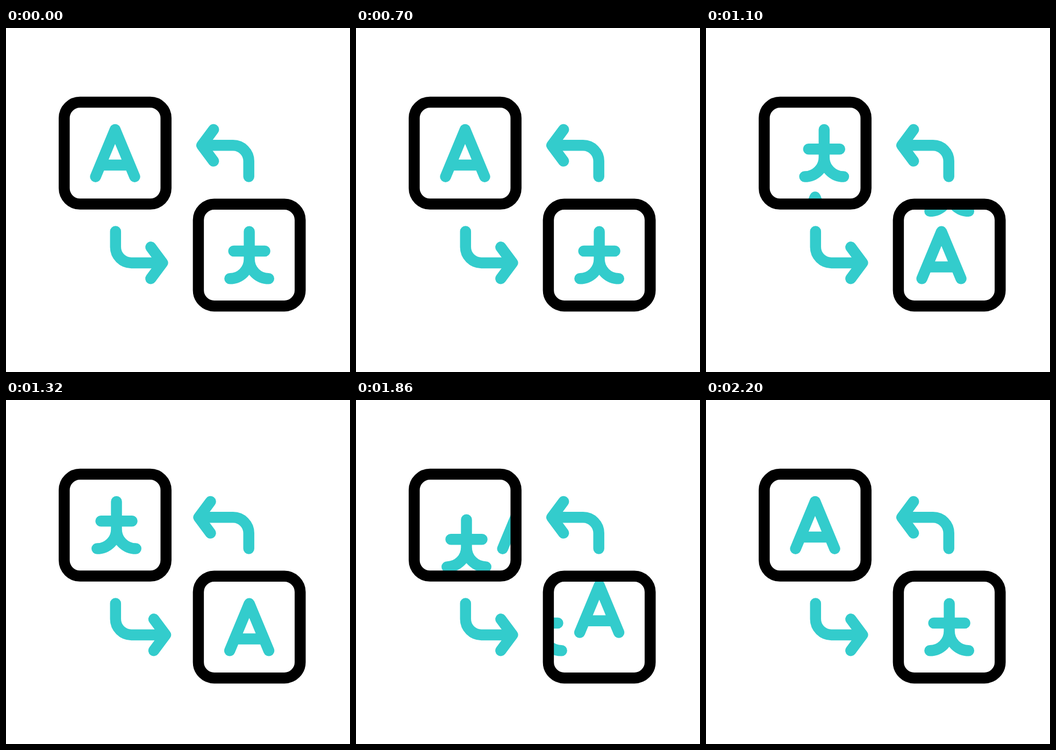
Animation of 640x640 px, one loop 2400 ms. Source, as an HTML page:

```html
<!DOCTYPE html>
<html lang="en">
<head>
<meta charset="utf-8">
<title>Translate</title>
<style>
  html, body { margin: 0; width: 100%; height: 100%; overflow: hidden; background: #fff; }
  svg { display: block; width: 100%; height: 100%; }
  .ink { fill: none; stroke: #33cccc; stroke-width: 20.5; stroke-linecap: round; stroke-linejoin: round; }
  .box { fill: none; stroke: #000; stroke-width: 20.5; }
</style>
</head>
<body>
<svg viewBox="0 0 640 640">
  <defs>
    <clipPath id="inside"><rect x="-94.7" y="-94.7" width="189.4" height="189.4" rx="29.4"/></clipPath>
    <rect id="frame" x="-94.7" y="-94.7" width="189.4" height="189.4" rx="29.4"/>
    <path id="latin" d="M-36.4 43.8L0 -43.8L36.4 43.8M-27 22.1H27"/>
    <path id="han" d="M0 -43.8V7.6A36.2 36.2 0 0 1 -36.2 43.8M0 7.6A36.2 36.2 0 0 0 36.2 43.8M-29 -7.5H29"/>
    <g id="arrow">
      <path class="shaft"/>
      <path class="head" d="M386.1 189L364.3 218.3L386.1 247.6"/>
    </g>
  </defs>

  <g transform="translate(203 232.8)">
    <g class="ink" clip-path="url(#inside)">
      <use href="#latin" id="latinA"/>
      <use href="#han" id="hanA"/>
    </g>
    <use href="#frame" class="box"/>
  </g>

  <g transform="translate(452.6 422.5)">
    <g class="ink" clip-path="url(#inside)">
      <use href="#latin" id="latinB"/>
      <use href="#han" id="hanB"/>
    </g>
    <use href="#frame" class="box"/>
  </g>

  <use href="#arrow" class="ink"/>
  <use href="#arrow" class="ink" transform="rotate(180 327.75 327.6)"/>
</svg>
<script>
  const LOOP = 2400, STEP = 20;
  const TRAVEL = 140;   // distance a letter slides
  const REACH = 12;     // how far an arrow stretches
  const HAN_X = 2.5;    // resting offset of the character in the upper box

  const $ = id => document.getElementById(id);
  const shaft = document.querySelector('.shaft');
  const head = document.querySelector('.head');

  const ease = (t, from, to) => {
    const p = Math.min(1, Math.max(0, (t - from) / (to - from)));
    return p * p * (3 - 2 * p);
  };
  const pulse = (t, from) => ease(t, from, from + 250) - ease(t, from + 250, from + 500);
  const move = (id, x, y) => $(id).setAttribute('transform', `translate(${x} ${y})`);

  function draw(ms) {
    const t = Math.floor((ms % LOOP) / STEP) * STEP;

    const reach = REACH * (pulse(t, 200) + pulse(t, 1200));
    head.setAttribute('transform', `translate(${-reach} 0)`);
    shaft.setAttribute('d', `M451.7 276.6V247.6A29.3 29.3 0 0 0 422.4 218.3H${366 - reach}`);

    const swap = ease(t, 700, 1200), back = ease(t, 1700, 2200);
    if (t < 1700) {
      move('latinA', 0, TRAVEL * swap);
      move('hanA', HAN_X + (TRAVEL - HAN_X) * (1 - swap), 0);
      move('latinB', -TRAVEL * (1 - swap), 0);
      move('hanB', 0, -TRAVEL * swap);
    } else {
      move('latinA', TRAVEL * (1 - back), 0);
      move('hanA', HAN_X, TRAVEL * back);
      move('latinB', 0, -TRAVEL * back);
      move('hanB', -TRAVEL * (1 - back), 0);
    }
  }

  const start = performance.now();
  function tick() {
    draw(performance.now() - start);
    requestAnimationFrame(tick);
  }
  tick();
</script>
</body>
</html>
```
